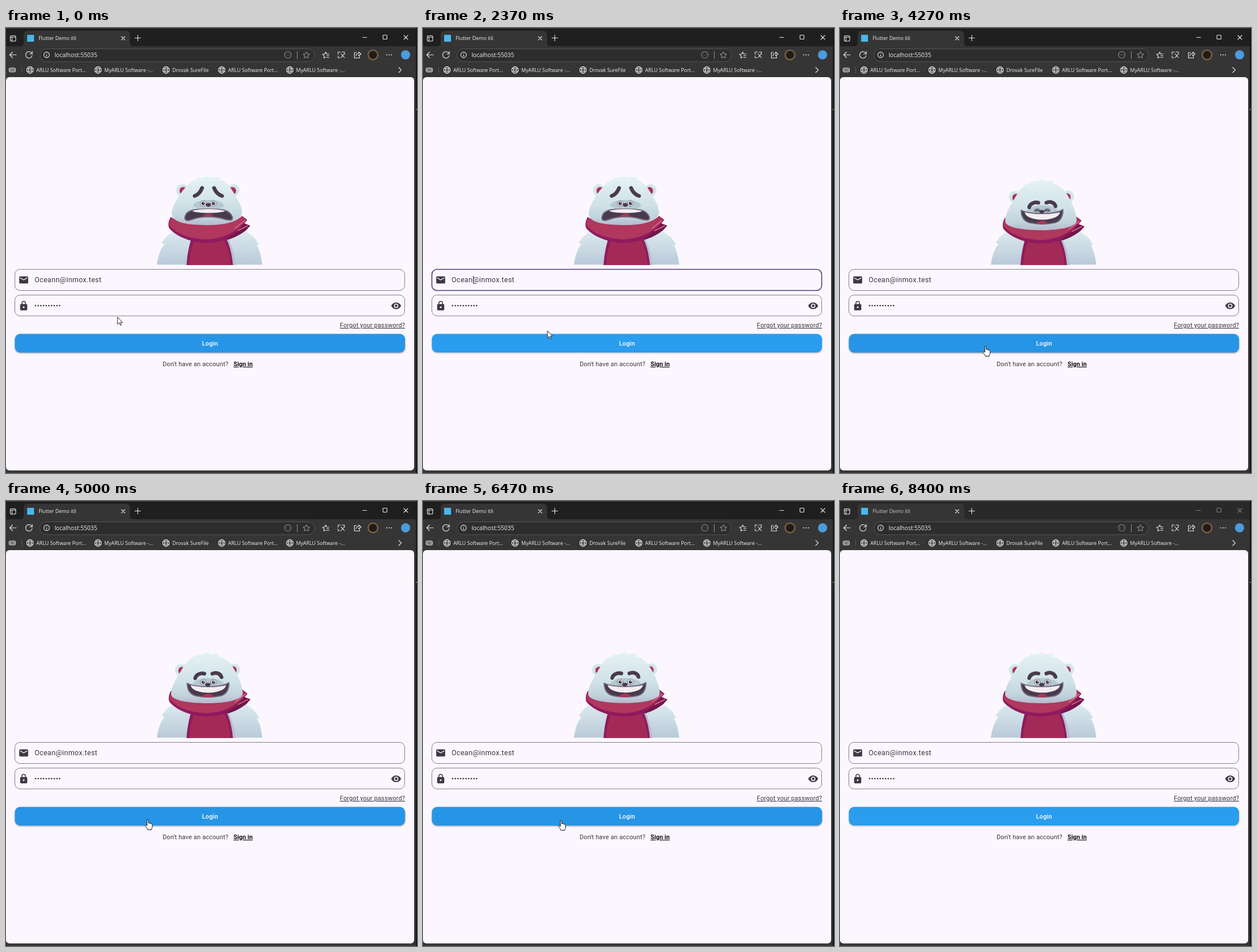
An HTML page that plays this animation: 719x779 px, repeating every 8430 ms.

```html
<!DOCTYPE html>
<html lang="en">
<head>
<meta charset="utf-8">
<title>Login demo</title>
<style>
html, body { margin: 0; width: 100%; height: 100%; overflow: hidden; background: #353535 }
svg { display: block; width: 719px; height: 779px }
text { white-space: pre; text-decoration-skip-ink: none }
.ui { font: 8.8px "Open Sans", "Noto Sans", sans-serif; fill: #f0f0f0 }
.app { font: 10.9px Roboto, sans-serif; letter-spacing: .16px; fill: #37343a }
.line { fill: none; stroke: #e8e8e8; stroke-width: 1.1; stroke-linecap: round; stroke-linejoin: round }
.field { fill: none }
.icon { fill: #3d3943 }
</style>
</head>
<body>
<svg viewBox="0 0 719 779">
  <defs>
    <linearGradient id="fur" x1="0" y1="0" x2="0" y2="1">
      <stop offset="0" stop-color="#e6f3f5"/><stop offset=".6" stop-color="#cfe1e7"/><stop offset=".85" stop-color="#c0d3dc"/><stop offset="1" stop-color="#b5b9cb"/>
    </linearGradient>
    <linearGradient id="body" x1="0" y1="0" x2="0" y2="1">
      <stop offset="0" stop-color="#deecf0"/><stop offset="1" stop-color="#b9c9d8"/>
    </linearGradient>
    <radialGradient id="photo"><stop offset=".65" stop-color="#211b17"/><stop offset="1" stop-color="#a98358"/></radialGradient>
    <filter id="blur" x="-5%" y="-50%" width="110%" height="200%"><feGaussianBlur stdDeviation="1.6"/></filter>
    <clipPath id="frame"><path d="M250,240H465V415H250Z"/></clipPath>
    <g id="globe" class="line" stroke-width="1">
      <circle r="5.7"/><ellipse rx="2.5" ry="5.7"/><path d="M-5.2,-2H5.2M-5.2,2H5.2"/>
    </g>
  </defs>

  <!-- browser window -->
  <rect width="719" height="779" fill="#353535"/>
  <rect id="titleBar" width="719" height="32"/>
  <path d="M25,32Q31,32 31,26V12Q31,5 38,5H210Q217,5 217,12V26Q217,32 223,32Z" fill="#353535"/>
  <path d="M0,.5H718M0,778.5H718" stroke="#3b3d2d"/>
  <path d="M718,0V779" stroke="#0d141c" stroke-width="2"/>
  <path d="M717,142.5H719" stroke="#bbb"/>
  <g class="line">
    <rect x="7.5" y="13.5" width="9.5" height="9.5" rx="2"/>
    <path d="M8,16H17M10.5,16V23M202,15l6,6m0,-6l-6,6M225.500,17.500h10m-5,-5v10"/>
    <g id="windowButtons">
      <path d="M624,16.500h7M696,13l7,7m0,-7l-7,7"/><rect x="659.5" y="12.500" width="7" height="7" rx="1"/>
    </g>
  </g>
  <text id="tabTitle" class="ui" x="57" y="21">Flutter Demo itli</text>
  <rect x="37" y="12" width="12" height="12" fill="#48b7ee"/>
  <rect x="59.500" y="36.500" width="480" height="22.500" rx="11" fill="#2d2d2d" stroke="#55564c"/>
  <text class="ui" x="85" y="51" style="font-size:10.2px">localhost:55035</text>
  <g class="line">
    <path d="M18,47H6.500M11.500,42L6.500,47L11.500,52"/>
    <path d="M45.500,45A5.700,5.700 0 1 0 45.800,48M46,41V45.300H41.700"/>
    <circle cx="71" cy="47" r="4.900"/><path d="M71,46.500V49.500M71,44.500V44.600"/>
    <g stroke="#8b8b8b">
      <circle cx="493" cy="47" r="5.700"/><path d="M490.500,47h.1m2.400,0h.1m2.400,0h.1M509.500,41V54"/>
      <path d="M525.500,41.500l1.800,3.600l4,.6l-2.900,2.800l.7,4l-3.600,-1.900l-3.600,1.900l.7,-4l-2.900,-2.800l4,-.6Z"/>
    </g>
    <path d="M559,51l-3,1.500l.6,-3.700l-2.800,-2.700l3.800,-.6l1.700,-3.500l1.700,3.500h4M561,48.500h4M561,51.500h4"/>
    <path d="M581,46V42H585M588,42H592V46M581,49V52H584M586,45l6,7m0,-7l-6,7"/>
    <path d="M613,43H609.500V52.500H618.500V50M612,49Q613,44.500 617,44.500V42L621,45.500L617,49V46.800"/>
    <path d="M666,47h.1m4,0h.1m4,0h.1" stroke-width="1.800"/>
    <rect x="5.500" y="70" width="11" height="7" rx="2.500"/><rect x="7.500" y="72" width="7" height="3" rx="1"/>
    <path d="M687,69l4.500,4.500l-4.500,4.500"/>
    <path d="M27.500,68V79" stroke="#555"/>
  </g>
  <circle cx="642" cy="47" r="9.300" fill="url(#photo)"/>
  <circle cx="699" cy="47" r="8" fill="#4c9bdc"/>
  <g id="bookmarks"></g>

  <!-- page -->
  <rect y="86" width="714" height="688.500" rx="6" fill="#fcf7fe"/>
  <g clip-path="url(#frame)">
    <path d="M263,415C265,400 270,386 276,378L271,377C277,366 287,357 300,352H412C425,357 437,366 441,376L445,379L440,381C446,392 448,404 449,415Z" fill="url(#body)" stroke="#f3fafb" stroke-width="1.500"/>
    <path d="M328,364C321,378 317,396 314,415H402C399,395 394,378 385,361Z" fill="#b5bfd1"/>
    <path d="M326,363C320,380 317,398 316,415H397C395,395 391,377 381,361Z" fill="#8f1a5e"/>
    <path d="M331,368C324,384 321,400 320,415H393C392,397 388,383 380,368Z" fill="#a32a57"/>
    <g id="scarf">
      <path d="M288,331C284,338 283,346 286,351C300,367 328,376 350,376C378,376 405,365 420,354L427,346L417,342L422,336L413,329C400,345 320,350 288,331Z" fill="#8f1a5e"/>
      <path d="M289,332C285,340 285,345 288,348C303,364 330,370 352,370C380,369 403,357 419,338L413,329C400,345 320,350 289,332Z" fill="#b0375d"/>
      <path d="M388,367C400,360 410,352 416,342L427,346L420,354C411,361 399,368 386,371Z" fill="#73164b"/>
      <path d="M400,351L419,336M405,355L423,346" stroke="#d67890" stroke-width="1.500"/>
    </g>
    <g id="head">
      <g id="shapes"></g>
      <g id="eyes"></g>
    </g>
  </g>

  <rect id="email" class="field" x="15.500" y="422.500" width="682" height="37" rx="9"/>
  <rect class="field" x="15.500" y="467.500" width="682" height="36.500" rx="9" stroke="#837b88"/>
  <g class="icon">
    <path transform="translate(21.600 431.700) scale(.78)" d="M20,4H4A2,2 0 0 0 2,6V18A2,2 0 0 0 4,20H20A2,2 0 0 0 22,18V6A2,2 0 0 0 20,4ZM20,8L12,13L4,8V6L12,11L20,6Z"/>
    <path transform="translate(21.600 477) scale(.78)" fill-rule="evenodd" d="M18,8H17V6A5,5 0 0 0 7,6V8H6A2,2 0 0 0 4,10V20A2,2 0 0 0 6,22H18A2,2 0 0 0 20,20V10A2,2 0 0 0 18,8ZM12,17A2,2 0 1 1 12,13A2,2 0 0 1 12,17ZM15.100,8H8.900V6A3.100,3.100 0 0 1 15.100,6Z"/>
    <path transform="translate(673.200 477) scale(.78)" fill-rule="evenodd" d="M12,4.500C7,4.500 2.700,7.600 1,12C2.700,16.400 7,19.500 12,19.500S21.300,16.400 23,12C21.300,7.600 17,4.500 12,4.500ZM12,17A5,5 0 1 1 12,7A5,5 0 0 1 12,17ZM12,9A3,3 0 1 0 12,15A3,3 0 0 0 12,9Z"/>
  </g>
  <text id="address" class="app" x="50" y="445" style="font-size:12.3px;letter-spacing:.4px"></text>
  <path id="caret" d="M95.500,434V448" stroke="#54407f" stroke-width="1.400"/>
  <path d="M51.700,486H95" stroke="#37343a" stroke-width="2.700" stroke-linecap="round" stroke-dasharray="0 4.680"/>
  <text class="app" x="698" y="524" text-anchor="end" text-decoration="underline">Forgot your password?</text>
  <rect id="shadow" x="16" y="537" width="682" height="32" rx="9" filter="url(#blur)"/>
  <rect id="button" x="15.500" y="535.500" width="682.500" height="32.500" rx="9"/>
  <text class="app" x="357" y="556" text-anchor="middle" style="fill:#fff;font-weight:500">Login</text>
  <text class="app" x="274" y="592">Don't have an account?</text>
  <text class="app" x="398" y="592" text-decoration="underline" style="fill:#111;font-weight:700;letter-spacing:0">Sign in</text>

  <g id="cursor" fill="#fff" stroke="#111" stroke-linejoin="round">
    <path id="arrow" d="M0,0V12.500L3,9.800L5,14.500L7,13.600L5,9.200H8.800Z" stroke-width=".9"/>
    <path id="hand" d="M-1.200,1C-1.200,-.7 1.300,-.7 1.300,1V6C2,5.200 3.700,5.400 3.800,6.600C4.600,5.900 6,6.200 6.100,7.300C7,6.800 8,7.400 8,8.600V12C8,14 6.700,15 6.500,17.500H-.2C-.4,15.500 -3,13.500 -4.400,10.600C-5,9 -3.400,8.300 -2.400,9.400L-1.200,10.700Z"/>
    <path id="beam" d="M-2.500,-6H-.5L0,-5.500L.5,-6H2.500M0,-5.500V6M-2.500,6.500H-.5L0,6L.5,6.500H2.500" fill="none"/>
  </g>
</svg>
<script>
const LOOP = 8430;
const $ = id => document.getElementById(id);
const set = (el, attrs) => { for (const k in attrs) el.setAttribute(k, attrs[k]); };
const lerp = (a, b, k) => a + (b - a) * k;
const ease = (t, from, to) => {
  const k = Math.min(1, Math.max(0, (t - from) / (to - from)));
  return k * k * (3 - 2 * k);
};

// Blend two strings that hold the same count of numbers.
const NUM = /-?\d+(\.\d+)?/g;
function mix(a, b, k) {
  const ends = b.match(NUM);
  let i = 0;
  return a.replace(NUM, v => +lerp(+v, +ends[i++], k).toFixed(2));
}

$('bookmarks').innerHTML = [
  [42, 'ARLU Software Port...'], [161, 'MyARLU Software -...'], [280, 'Drovak SureFile'],
  [377.5, 'ARLU Software Port...'], [496.5, 'MyARLU Software -...']
].map(([x, label]) => `<use href="#globe" x="${x}" y="73.5"/><text class="ui" x="${x + 11}" y="76.500">${label}</text>`).join('');

const ear = (x, y, r) => `M${x - r},${y}A${r},${r} 0 1 1 ${x + r},${y}A${r},${r} 0 1 1 ${x - r},${y}Z`;
const WHITE = '#f3fafb', INK = '#493b4d', RED = '#b0305a';
// fill, stroke, stroke width, worried shape, cheerful shape
const parts = [
  ['#d5e6ea', WHITE, 2, ear(308, 284, 11.5), ear(306, 294, 11.5)],
  [RED, '#c8d5de', 1, ear(310, 285, 7), ear(308, 295, 7)],
  ['#d5e6ea', WHITE, 2, ear(398, 284, 11.5), ear(399, 293, 11.5)],
  [RED, '#c8d5de', 1, ear(396, 285, 7), ear(397, 294, 7)],
  ['url(#fur)', 'none', 0,
    'M290,325C290,312 304,290 314,279C322,270 327,266 334,265L333,261C343,264 348,260 356,259L355,262C364,260 370,260 376,262L374,265C386,270 393,279 398,288C405,300 413,312 413,322C414,338 385,345 353,345C322,345 290,342 290,325Z',
    'M289,336C289,321 303,301 311,287C317,277 325,270 333,269L332,266C341,268 347,265 355,262L356,267C363,265 369,264 374,266L371,270C385,273 392,281 397,289C406,303 414,321 414,335C414,346 385,352 353,352C322,352 289,348 289,336Z'],
  ['#b4c8d2', 'none', 0,
    'M327,310C334,298 374,298 382,310C379,320 331,320 327,310Z',
    'M327,318C334,305 374,305 382,318C379,326 331,326 327,318Z'],
  [INK, '#71687a', 2,
    'M313,331C316,316 335,317 354,317C373,317 391,316 396,331C397,339 388,336 383,335C365,329 343,329 326,335C318,338 312,338 313,331Z',
    'M317,317C326,322 340,323 354,323C368,323 381,322 390,316C390,328 386,336 376,339C363,342 345,342 332,339C321,336 317,328 317,317Z'],
  ['#f2edf3', 'none', 0,
    'M326,320C340,316 368,316 383,320C380,325 330,325 326,320Z',
    'M323,320.5C340,325 368,325 385,320.5C382,338 326,338 323,320.5Z'],
  ['#ad3558', 'none', 0,
    'M344,331C348,323 360,323 364,331C358,329 350,329 344,331Z',
    'M344,340C348,334 359,334 363,340C357,342 350,342 344,340Z'],
  [INK, 'none', 0,
    'M349,308C351,306 357,306 359,308C359,311 356,313 354,313C352,313 349,311 349,308Z',
    'M348,318C350,316 356,316 358,318C358,321 355,323 353,323C351,323 348,321 348,318Z'],
  ['none', INK, 6.5, 'M330,294C336,292 340,288 343,280', 'M331,308C332,302 340,298 347,300'],
  ['none', INK, 6.5, 'M364,280C367,288 372,292 378,294', 'M361,300C367,297 375,299 377,306']
];
$('shapes').innerHTML = parts.map(([fill, stroke, width]) =>
  `<path fill="${fill}" stroke="${stroke}" stroke-width="${width}" stroke-linecap="round" stroke-linejoin="round"/>`).join('');
const shapes = [...$('shapes').children];

const eye = x => `<circle cx="${x}" r="5" fill="#f6f5f8" stroke="#6a6272" stroke-width=".9"/>
  <circle cx="${x}" r="2.900" fill="#3d3344"/><circle cx="${x + 1}" cy="-1.200" r=".9" fill="#fff"/>`;
const lid = x => `<ellipse cx="${x}" rx="5.500" ry="4" fill="#8c98a5"/><path d="M${x - 5},2Q${x},-3 ${x + 5},2" fill="none" stroke="${INK}" stroke-width="1.500"/>`;
$('eyes').innerHTML = `<g>${eye(345)}${eye(363)}</g><g>${lid(345)}${lid(362.5)}</g>`;
const [open, shut] = $('eyes').children;

function drawBear(t) {
  const joy = ease(t, 3320, 3640);
  const laugh = joy * (1 - ease(t, 4750, 5050));
  const bob = joy * (1 - Math.cos((t - 5770) / 1753 * 2 * Math.PI) + 1.5 * laugh);
  parts.forEach(([, , , sad, glad], i) => set(shapes[i], { d: mix(sad, glad, joy) }));
  for (const brow of shapes.slice(-2)) set(brow, { transform: `translate(0 ${4 * laugh})` });
  set($('head'), { transform: `translate(0 ${bob})` });
  set($('scarf'), { transform: `translate(${joy * .5} ${joy * .7 + bob * .3})` });
  set($('eyes'), { transform: `translate(0 ${lerp(307, 315, joy) + 2 * laugh})` });
  set(open, { opacity: 1 - laugh });
  set(shut, { opacity: laugh });
}

// time, x, y of the pointer
const track = [
  [0, 195, 506], [100, 195, 506], [820, 94, 439.5], [1750, 94, 439.5], [2650, 254.5, 557],
  [4700, 254.5, 557], [5300, 241.5, 559], [6500, 241.5, 559], [7080, -8, 97], [7250, -8, 97],
  [7600, -40, 90], [LOOP, -40, 90]
];
function pointer(t) {
  const i = track.findIndex(p => p[0] > t);
  const [t0, x0, y0] = track[i - 1], [t1, x1, y1] = track[i];
  const k = ease(t, t0, t1);
  return [lerp(x0, x1, k), lerp(y0, y1, k)];
}

function draw(t) {
  const [x, y] = pointer(t);
  const within = (top, bottom) => x > 15 && x < 698 && y > top && y < bottom;
  const kind = within(535, 568) ? 'hand' : within(422, 460) || within(467, 504) ? 'beam' : 'arrow';
  for (const id of ['arrow', 'hand', 'beam']) $(id).style.display = id === kind ? '' : 'none';
  set($('cursor'), { transform: `translate(${x} ${y})` });

  const active = t < 8080;
  set($('titleBar'), { fill: active ? '#1f1f1f' : '#292929' });
  set($('windowButtons'), { opacity: active ? 1 : .45 });
  set($('tabTitle'), { opacity: active ? 1 : .8 });

  const focus = ease(t, 860, 960) * (1 - ease(t, 3050, 3150));
  set($('email'), { stroke: mix('rgb(131,123,136)', 'rgb(82,62,120)', focus), 'stroke-width': lerp(1, 1.6, focus) });
  const trimmed = t > 1500;
  $('address').textContent = trimmed ? 'Ocean@inmox.test' : 'Oceann@inmox.test';
  set($('caret'), {
    opacity: t > 880 && t < 3060 && (t - 880) % 1000 < 500 ? 1 : 0,
    transform: `translate(${trimmed ? -7.2 : 0} 0)`
  });

  const hover = kind === 'hand' ? 1 : 1 - ease(t, 60, 220);
  const press = ease(t, 3030, 3140) * (1 - ease(t, 3240, 3480));
  const base = mix('rgb(42,157,238)', 'rgb(39,149,229)', hover);
  set($('button'), { fill: mix(base, 'rgb(96,170,217)', press) });
  set($('shadow'), { fill: '#243a52', opacity: lerp(.4, .62, hover) });

  drawBear(t);
}

const start = performance.now();
function tick() {
  draw((performance.now() - start) % LOOP);
  requestAnimationFrame(tick);
}
tick();
</script>
</body>
</html>
```
